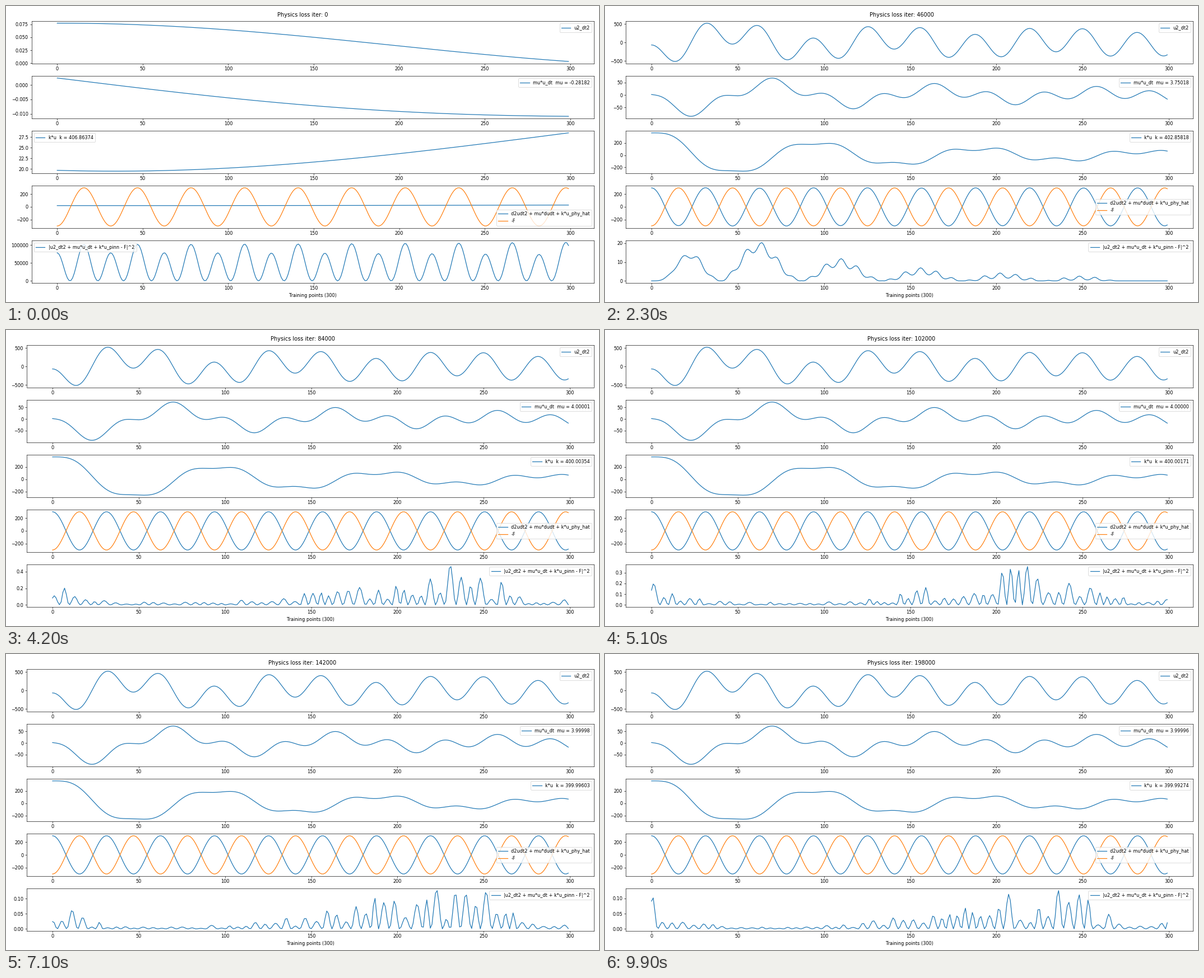
Animation, 1058 px wide and 529 px high, one loop 10 s. Source, as a matplotlib script:

```python
import numpy as np
import matplotlib.pyplot as plt
from matplotlib.animation import FuncAnimation

W, H = 1058, 529
DPI = H / 9
EM = 10 * DPI / 72          # tick label font size in pixels
TOP, BOTTOM, GAP = 27.2, 494.7, 22.75
FRAMES = 100

x = np.arange(300)
t = x / 299

# Damped oscillator u'' + 4u' + 400u = 300 cos(60 t)
WN = np.sqrt(396)
FORCE = 300 * np.cos(60 * t)
DECAY = np.exp(-2 * t)
TRANS = DECAY * (np.cos(WN * t) + 2 / WN * np.sin(WN * t))
TRANS_DT = -400 / WN * DECAY * np.sin(WN * t)
DEN = 3200**2 + 240**2
C, D = -300 * 3200 / DEN, 300 * 240 / DEN
FORCED = C * np.cos(60 * t) + D * np.sin(60 * t)
FORCED_DT = 60 * (D * np.cos(60 * t) - C * np.sin(60 * t))

# Output of the untrained network
RAW = 0.0483 - 0.00876 * t + 0.01775 * t**2 + 0.00737 * (1 - np.cos(2.4 * t))
RAW_DT = -0.00876 + 0.0355 * t + 0.01768 * np.sin(2.4 * t)
RAW_DT2 = 0.03477 + 0.04243 * np.cos(2.4 * t)

# How strongly parameter errors show up along the interval
GAIN = 1.07 * (1 - np.exp(-(x / 19) ** 1.5)) / (1 + np.exp((x - 268) / 5))
RIPPLE = GAIN * (0.25 + 0.2 * t) * np.cos(2 * np.pi * (x - 64) / 9.2)

# Noise is strong at both ends and around point 243
ENVELOPE = (0.04 + 0.8 * np.exp(-x / 15) + 0.35 * np.exp((x - 299) / 3)
            + np.exp(-((x - 243) / np.where(x < 243, 85, 22)) ** 2))


def mu_at(n):
    return np.interp(n, [0, 12, 23, 30, 42, 99],
                     [-0.28182, 1.94479, 3.75018, 3.99, 4.000009, 3.99996])


def k_at(n):
    return np.interp(n, [0, 12, 23, 38, 42, 59, 71, 99],
                     [406.86374, 404.87234, 402.85818, 400.2, 400.00354,
                      400.00009, 399.99603, 399.99274])


def noise(n):
    """Squared residual noise: sine lobes of random length and height."""
    rng = np.random.default_rng(n)
    zeros = np.r_[-2, -2 + np.cumsum(rng.uniform(4, 7, 90))]
    phase = np.interp(x, zeros, np.arange(91))
    height = rng.uniform(0.15, 1, 91)[phase.astype(int)]
    lobes = ENVELOPE * height * np.sin(np.pi * phase) ** 2
    level = np.clip(0.46 - 0.0115 * (n - 42), 0.126, 0.46)
    return level * np.clip((n - 24) / 12, 0, 1) * lobes / lobes.max()


def state(n):
    """Parameters and curves after n stages of training."""
    mu, k = mu_at(n), k_at(n)
    slow, fast = 1 - np.exp(-0.9 * n), 1 - np.exp(-0.6 * n)
    lag = 0.02 * (4 - mu) / 2.055 * np.exp(-t / 0.03)
    u = slow * (TRANS - lag) + fast * FORCED + (1 - slow) * RAW
    u_dt = slow * (TRANS_DT + lag / 0.03) + fast * FORCED_DT + (1 - slow) * RAW_DT
    error = GAIN * ((mu - 4) * TRANS_DT + (k - 400) * TRANS)
    raw_sum = RAW_DT2 + mu * RAW_DT + k * RAW
    total = fast * FORCE + slow * error + (1 - slow) * raw_sum
    u_dt2 = total - mu * u_dt - k * u
    ripple = RIPPLE * np.clip((38 - n) / 15, 0, 1)
    loss = (np.abs(total - FORCE) + ripple) ** 2 + noise(n)
    return mu, k, u_dt2, mu * u_dt, k * u, total, loss


def label_width(ax):
    """Widest visible y tick label in em."""
    lo, hi = ax.get_ylim()
    ticks = ax.get_yticks()
    texts = ax.yaxis.get_major_formatter().format_ticks(ticks)
    size = {"\u2212": 0.838, ".": 0.318}
    return max(sum(size.get(ch, 0.636) for ch in s)
               for v, s in zip(ticks, texts) if lo <= v <= hi)


fig, axes = plt.subplots(5, 1, figsize=(18, 9), dpi=DPI)
panel = (BOTTOM - TOP - 4 * GAP) / 5
fig.subplots_adjust(right=1049.2 / W, top=1 - TOP / H, bottom=1 - BOTTOM / H,
                    hspace=GAP / panel)
title = fig.suptitle("")
axes[4].set_xlabel("Training points (300)")

LABELS = ["u2_dt2", "mu*u_dt", "k*u", "d2udt2 + mu*dudt + k*u_phy_hat",
          "|u2_dt2 + mu*u_dt + k*u_pinn - F|^2"]
lines = [ax.plot(x, t, label=s)[0] for ax, s in zip(axes, LABELS)]
axes[3].plot(x, -FORCE, label="-F")
legends = [ax.legend(loc="best") for ax in axes]


def update(n):
    mu, k, *curves = state(n)
    title.set_text(f"Physics loss iter: {2000 * n}")
    for ax, line, y in zip(axes, lines, curves):
        line.set_ydata(y)
        ax.relim()
        ax.autoscale_view()
    legends[1].get_texts()[0].set_text(f"mu*u_dt  mu = {mu:.5f}")
    legends[2].get_texts()[0].set_text(f"k*u  k = {k:.5f}")
    legends[3].set_loc("center right" if n else "lower right")
    legends[4].set_loc("best" if n else "upper left")
    widest = max(label_width(ax) for ax in axes)
    # Outer margin, tick length with padding, then the label itself
    fig.subplots_adjust(left=EM * (1.08 + 0.7 + widest) / W)
    return lines


anim = FuncAnimation(fig, update, frames=FRAMES, interval=100, init_func=lambda: lines,
                     repeat=True, repeat_delay=0, blit=False)
plt.show()
```
